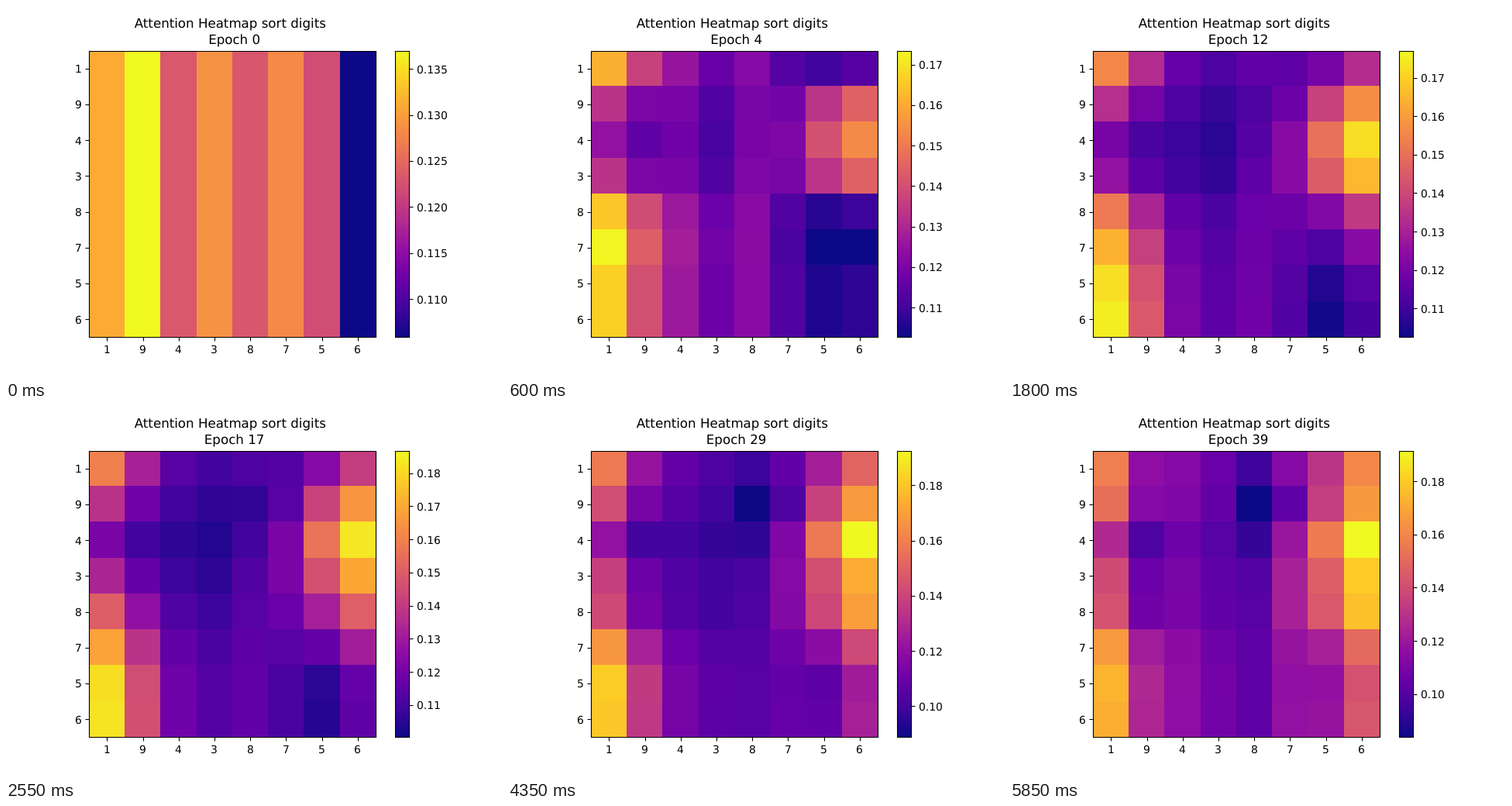
Recreate the animation shown at these times as an HTML page. Size 640 by 480 pixels, loop 6000 ms.

```html
<!DOCTYPE html>
<html lang="en">
<head>
<meta charset="utf-8">
<title>Attention Heatmap</title>
<style>
html, body { margin: 0; width: 100%; height: 100%; overflow: hidden; background: #fff; }
svg { display: block; width: 640px; height: 480px; }
text {
  font-family: "DejaVu Sans", sans-serif; font-size: 13.889px; fill: #000;
  white-space: pre; text-rendering: geometricPrecision;
}
.title { font-size: 16.667px; text-anchor: middle; }
.ink { stroke: #000; stroke-width: 1.11; fill: none; }
</style>
</head>
<body>
<svg id="stage" viewBox="0 0 640 480"></svg>
<script>
const STEP = 150, EPOCHS = 40;
const DIGITS = [1, 9, 4, 3, 8, 7, 5, 6];
const LEFT = 107.2, TOP = 57.6, SIZE = 369.6, CELL = SIZE / 8;
const BOTTOM = TOP + SIZE;
const PLASMA = ['0d0887', '41049d', '6a00a8', '8f0da4', 'b12a90', 'cc4778',
  'e16462', 'f2844b', 'fca636', 'fcce25', 'f0f921'];
const RGB = PLASMA.map(h => [0, 2, 4].map(i => parseInt(h.slice(i, i + 2), 16)));

// Each track maps an epoch to a few values, linear in between.
// Ends of the colour scale:
const SCALE = {
  0: [.1059, .13697], 4: [.10269, .17343], 8: [.10434, .1693], 17: [.10033, .1868],
  22: [.09749, .19302], 29: [.08885, .1926], 39: [.0839, .1915]
};
// Mean level of each column, in percent of the scale
const LEVEL = {
  0: [81, 100, 56, 74, 55.5, 71.5, 52, 0],
  4: [52, 30, 26, 15, 26, 22, 36, 49],
  8: [56, 33, 18, 12, 22, 25, 35, 55],
  22: [60, 30, 11, 8, 12, 17, 36, 59],
  39: [68, 30, 27, 20, 16.5, 34, 44, 71]
};
// How far each row leans to the left columns (negative: to the right)
const LEAN = {
  0: Array(8).fill(0),
  4: [65, -19, -44, -19, 77, 100, 82, 82],
  8: [36, -32, -71, -63, 39, 64, 80, 92],
  22: [13, -34, -75, -33, -24, 31, 72, 69],
  39: [0, -10, -60, -35, -30, 18, 33, 30]
};
// Response of each column to the lean
const PULL = [.47, .28, .1, .07, .03, -.1, -.4, -.52];

function sample(track, epoch) {
  const keys = Object.keys(track).map(Number);
  const i = Math.max(1, keys.findIndex(k => k >= epoch));
  const a = keys[i - 1], b = keys[i], f = (epoch - a) / (b - a);
  return track[a].map((v, n) => v + (track[b][n] - v) * f);
}

// A soft hollow that deepens during training
const hollow = (r, c, epoch) =>
  .65 * epoch * Math.exp(-.9 * (r - 1) ** 2 - 1.5 * (c - 4.5) ** 2);

const svg = document.getElementById('stage');

function add(tag, attrs, parent = svg) {
  const node = document.createElementNS('http://www.w3.org/2000/svg', tag);
  for (const name in attrs) node.setAttribute(name, attrs[name]);
  return parent.appendChild(node);
}

function label(x, y, str, parent, cls = '') {
  const node = add('text', { x, y, class: cls }, parent);
  node.textContent = str;
  return node;
}

const line = (d, parent) => add('path', { d, class: 'ink' }, parent);
const snap = v => Math.round(v) + .5;
const baseline = y => Math.round(y + 5.5);

function box(x, y, x2, y2, fill) {
  return add('rect', {
    x, y, width: x2 - x, height: y2 - y, fill, 'shape-rendering': 'crispEdges'
  });
}

function plasma(v) {
  const s = Math.min(Math.max(v, 0), 1) * 10;
  const i = Math.min(Math.floor(s), 9);
  const mix = RGB[i].map((c, k) => Math.round(c + (RGB[i + 1][k] - c) * (s - i)));
  return `rgb(${mix})`;
}

// Fixed parts
box(0, 0, 640, 480, '#fff');
const edge = (start, i) => Math.ceil(start + i * 46.25 - .5);
const cells = DIGITS.map((_, r) => DIGITS.map((_, c) =>
  box(edge(107, c), Math.max(58, edge(57, r)), edge(107, c + 1), edge(57, r + 1), '#fff')));
const ramp = add('linearGradient', { id: 'ramp', x1: 0, y1: 1, x2: 0, y2: 0 }, add('defs', {}));
PLASMA.forEach((h, i) => add('stop', { offset: i / 10, 'stop-color': '#' + h }, ramp));
box(502, 58, 520, 427, 'url(#ramp)');
line('M107.5 58.5H477.5V427.5H107.5Z');
line('M502.5 58.5H520.5V427.5H502.5Z');

DIGITS.forEach((d, i) => {
  const x = LEFT + (i + .5) * CELL, y = TOP + (i + .5) * CELL;
  line(`M${snap(x)} 427.5V432.5`);
  line(`M107.5 ${snap(y)}H102.5`);
  label(Math.round(x - 4.42), 448, d);
  label(89, baseline(y), d);
});
label(289.3, 28, 'Attention Heatmap sort digits', svg, 'title');
const epochText = label(294.6, 49, '', svg, 'title');
const scale = add('g', {});

// Smallest round step that leaves at most nine intervals
const tickStep = range => [.0025, .005, .01, .02].find(s => s >= range / 9);

function drawScale(lo, hi) {
  scale.replaceChildren();
  const step = tickStep(hi - lo), places = step < .01 ? 3 : 2;
  for (let n = Math.ceil(lo / step); n * step <= hi; n++) {
    const y = BOTTOM - (n * step - lo) / (hi - lo) * SIZE;
    line(`M520.5 ${snap(y)}H525.5`, scale);
    label(530, baseline(y), (n * step).toFixed(places), scale);
  }
}

function draw(epoch) {
  const level = sample(LEVEL, epoch), lean = sample(LEAN, epoch);
  cells.forEach((row, r) => row.forEach((cell, c) => {
    const v = level[c] + PULL[c] * lean[r] - hollow(r, c, epoch);
    cell.setAttribute('fill', plasma(v / 100));
  }));
  epochText.textContent = 'Epoch ' + epoch;
  drawScale(...sample(SCALE, epoch));
}

let shown = -1;
const begin = performance.now();
function tick() {
  const epoch = Math.floor((performance.now() - begin) / STEP) % EPOCHS;
  if (epoch !== shown) draw(shown = epoch);
  requestAnimationFrame(tick);
}
tick();
</script>
</body>
</html>
```
